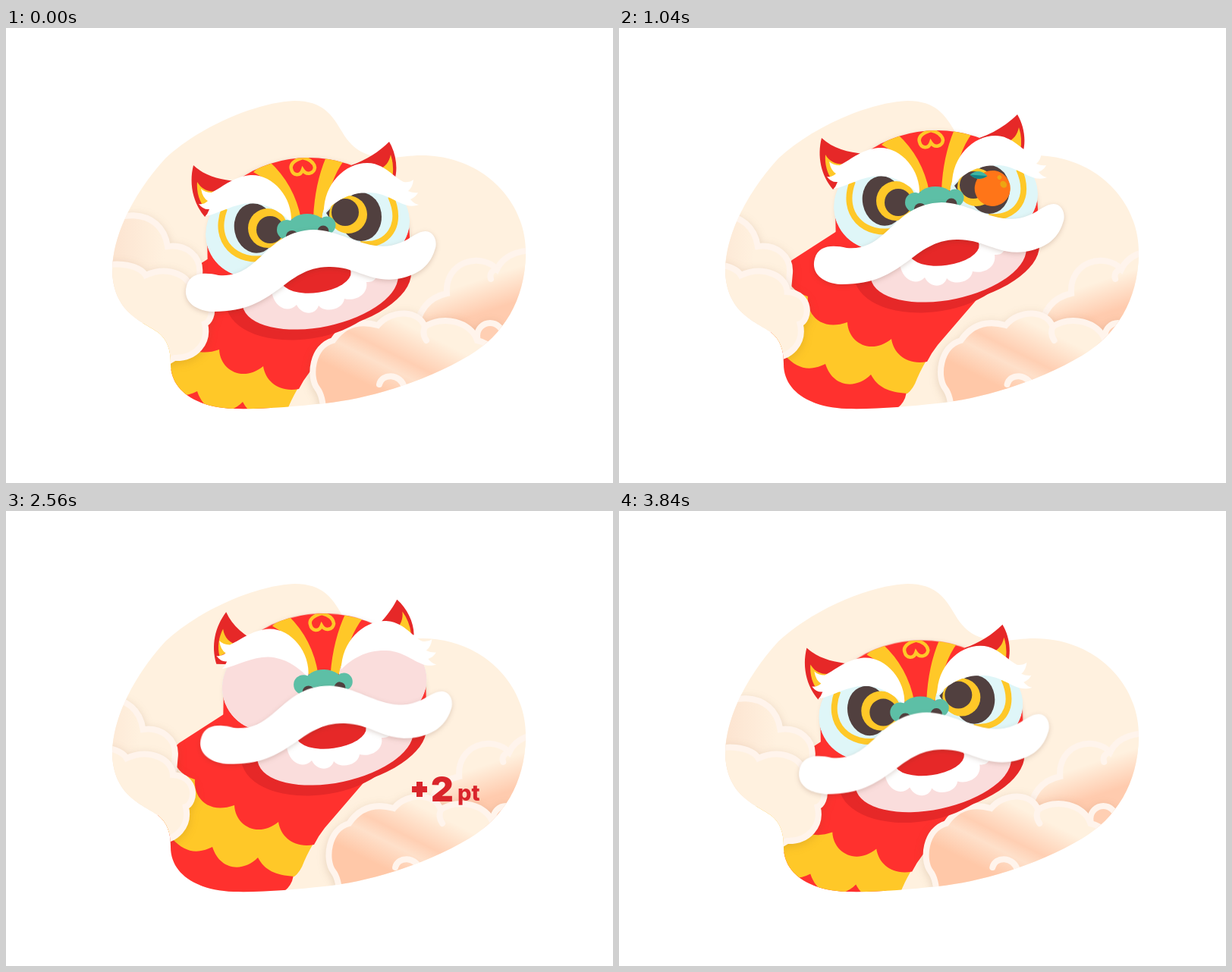
Recreate the animation shown at these times as an HTML page. Size 800x600 px, loop 3.88 s.

```html
<!DOCTYPE html>
<html lang="en">
<head>
<meta charset="utf-8">
<title>Lion dance</title>
<style>
  html, body { margin: 0; width: 100%; height: 100%; overflow: hidden; background: #fff; }
  svg { display: block; width: 800px; height: 600px; }
  .red { fill: #ff312e; } .dark { fill: #e62828; } .gold { fill: #ffc828; }
  .brown { fill: #51403f; } .pink { fill: #fadddc; } .pale { fill: #dff6f8; }
  .white { fill: #fff; } .teal { fill: #5dbfa6; }
  .stripe { fill: none; stroke: #ffc828; stroke-width: 8; }
  .cloud { stroke: #fff4ec; stroke-width: 8; }
  .curl { fill: none; stroke: #fff4ec; stroke-width: 8; stroke-linecap: round; }
  .soft { filter: drop-shadow(0 2px 3px rgba(90, 40, 20, .2)); }
  .lift { filter: drop-shadow(0 3px 6px rgba(120, 70, 30, .18)); }
  #score { fill: #d9252b; font-family: Inter, sans-serif; }
</style>
</head>
<body>
<svg viewBox="0 0 800 600">
  <defs>
    <path id="blob" d="M380,96 C418,96 430,115 443,137 C458,163 478,171 505,171 C520,171 530,168 548,168 C625,168 686,225 685,298 C684,360 655,405 610,432 C555,465 480,489 420,495 C380,499 340,503 300,502 C250,500 217,478 217,443 C217,425 213,411 200,401 C180,387 140,375 140,317 C142,265 175,210 210,172 C255,130 330,98 380,96Z"/>
    <ellipse id="skull" cx="399" cy="275" rx="133" ry="104"/>
    <ellipse id="cheekL" cx="321" cy="272" rx="58" ry="57"/>
    <ellipse id="cheekR" cx="474" cy="255" rx="58" ry="55"/>
    <clipPath id="inBlob"><use href="#blob"/></clipPath>
    <clipPath id="inSkull"><use href="#skull"/></clipPath>
    <clipPath id="inL"><use href="#cheekL"/></clipPath>
    <clipPath id="inR"><use href="#cheekR"/></clipPath>
    <linearGradient id="warm" gradientUnits="userSpaceOnUse" x1="560" y1="380" x2="500" y2="500">
      <stop offset=".18" stop-color="#fff1df"/><stop offset=".5" stop-color="#ffcfb3"/>
      <stop offset=".64" stop-color="#fee0ca"/><stop offset=".88" stop-color="#ffc8a8"/>
    </linearGradient>
    <linearGradient id="far" gradientUnits="userSpaceOnUse" x1="600" y1="310" x2="630" y2="400">
      <stop offset=".3" stop-color="#fff1df"/><stop offset=".75" stop-color="#ffcbae"/>
    </linearGradient>
    <linearGradient id="dusk">
      <stop offset=".1" stop-color="#fbdfcb"/><stop offset=".7" stop-color="#fff1df"/>
    </linearGradient>
    <g id="orange">
      <circle r="29" fill="#ff7518"/>
      <path d="M6,-21 Q-12,-22 -15,-40 Q4,-40 6,-21Z" fill="#3fb5a3"/>
      <path d="M6,-21 Q-12,-22 -15,-40Z" fill="#128488"/>
      <g fill="#eda512"><ellipse cx="18" cy="6" rx="5" ry="6"/><circle cx="20" cy="-7" r="3.5"/></g>
    </g>
  </defs>

  <use href="#blob" fill="#fff1df"/>
  <g clip-path="url(#inBlob)">
    <g id="backRight">
      <path class="cloud" fill="url(#far)" d="M540,400 Q545,358 581,350 C578,308 625,295 647,318 C657,297 680,291 720,292 V420 H560Z"/>
      <path class="curl" d="M647,318 Q636,321 639,331"/>
    </g>
    <g id="body">
      <g transform="translate(-20 36)">
        <path class="red" d="M200,400 L385,470 Q379,478 377,488 Q372,500 360,505 L350,560 H200Z"/>
        <path class="gold" d="M200,340 L250,353 L410,430 Q399,448 393,462 Q388,476 380,482 C355,480 341,474 332,457 C312,477 282,474 272,443 C252,453 235,450 219,432 L200,400Z"/>
        <path class="red" d="M287,268 L228,306 Q218,314 220,328 Q228,348 249,354 C247,380 268,400 301,388 C302,415 332,432 359,410 C362,430 380,445 406,440 Q412,428 420,418 L530,290 L420,250Z"/>
      </g>
    </g>
    <g id="frontRight" class="lift">
      <circle class="cloud" cx="638" cy="406" r="17" fill="#ffcfb3"/>
      <path class="cloud" fill="url(#warm)" d="M418,520 Q420,488 410,475 C399,460 403,420 431,412 C450,384 476,388 490,392 C508,370 545,372 552,394 C575,378 613,387 621,412 C638,416 653,430 648,450 L638,520Z"/>
      <path class="curl" d="M552,394 Q548,403 554,412 M492,470 C495,455 520,455 525,474"/>
    </g>
    <path id="backLeft" class="cloud lift" fill="url(#dusk)" d="M100,280 C140,235 205,235 213,288 C237,285 258,300 255,325 L250,380 H100Z"/>
    <path id="frontLeft" class="cloud lift" fill="#fff1df" d="M100,325 C140,302 177,313 184,326 C215,312 245,328 245,348 C278,350 275,385 262,390 C268,415 250,436 222,435 L180,460 L100,440Z"/>
  </g>

  <g id="head">
    <g id="tiltBack">
      <g id="earL">
        <path class="dark" d="M247,181 C262,195 282,200 303,202 L310,230 L262,249 C246,230 241,205 247,181Z"/>
        <path class="gold" d="M252,203 C258,213 267,217 281,215 L262,238 C254,228 251,215 252,203Z"/>
      </g>
      <g id="earR">
        <path class="dark" d="M505,150 C492,163 475,174 455,181 L470,205 L512,201 C517,185 514,165 505,150Z"/>
        <path class="gold" d="M507,167 C505,177 500,183 490,188 L509,198 Q512,182 507,167Z"/>
      </g>
      <use href="#skull" class="red soft"/>
      <path class="red" d="M265,270 L266,325 L320,345 V270Z"/>
    </g>
    <g id="jaw">
      <ellipse class="dark" cx="395" cy="350" rx="106" ry="60" transform="rotate(-9 395 350)"/>
      <ellipse class="dark" cx="418" cy="342" rx="118" ry="57" transform="rotate(-12 418 342)"/>
      <ellipse class="pink" cx="414" cy="345" rx="104.5" ry="49" transform="rotate(-12 414 345)"/>
      <path class="white" d="M350,340 C348,362 368,380 383,365 C390,379 408,379 412,366 C420,376 444,372 446,357 C462,361 478,350 475,335 C484,336 489,330 488,325 L455,312 L360,320Z"/>
      <ellipse class="dark" cx="409" cy="328" rx="46" ry="21" transform="rotate(-8 409 328)"/>
      <circle id="bite" cx="408" cy="350" r="15" fill="#ff7518"/>
    </g>
    <g id="tilt">
      <g clip-path="url(#inSkull)">
        <path class="gold" d="M326,190 Q336,180 347,176 Q380,206 389,252 L376,252 Q368,212 326,190Z M422,170 Q432,170 446,174 Q426,200 420,250 L405,250 Q407,205 422,170Z"/>
        <path class="stripe" style="stroke-width:4.5" d="M391,171 C380,174 374,180 376,186 C378,195 388,196 391,187 C396,195 406,192 407,184 C406,177 400,173 391,171Z"/>
      </g>
      <g clip-path="url(#inL)">
        <use href="#cheekL" class="pale"/>
        <path class="stripe" d="M288,238 C271,282 304,312 345,303"/>
        <ellipse class="brown" cx="328" cy="264" rx="27" ry="33" transform="rotate(-12 328 264)"/>
        <circle class="gold" cx="345" cy="264" r="26"/>
        <circle class="brown" cx="348" cy="266" r="18"/>
        <use href="#cheekL" class="pink lid"/>
      </g>
      <g clip-path="url(#inR)">
        <use href="#cheekR" class="pale"/>
        <path class="stripe" d="M507,222 C524,260 504,288 467,285"/>
        <ellipse class="brown" cx="468" cy="249" rx="27" ry="32"/>
        <path class="brown" d="M422,244 L440,225 L436,265Z"/>
        <circle class="gold" cx="451" cy="246" r="25"/>
        <circle class="brown" cx="447" cy="243" r="18"/>
        <use href="#cheekR" class="pink lid"/>
      </g>
      <path class="white" d="M376,256 C378,222 350,192 322,194 C300,196 288,208 271,217 Q262,217 257,212 Q259,224 266,228 Q261,233 254,232 Q260,240 268,239 Q266,245 262,249 C284,243 300,232 322,231 C345,231 362,243 376,256Z"/>
      <path class="white" d="M419,244 C418,207 446,178 476,178 C498,178 510,196 524,203 Q532,204 537,200 Q536,210 530,215 Q537,218 543,217 Q540,223 533,226 Q538,232 544,233 C522,241 508,217 478,217 C452,217 434,228 419,244Z"/>
      <g class="teal">
        <circle cx="370" cy="266" r="13"/><ellipse cx="397" cy="262" rx="25" ry="17"/><circle cx="423" cy="260" r="11.5"/>
      </g>
      <g class="brown"><circle cx="377" cy="275" r="8"/><circle cx="418" cy="268" r="7.5"/></g>
      <path class="white soft" d="M238,340 C243,322 262,322 280,326 C335,331 340,268 405,266 C445,266 480,300 520,283 C535,277 542,268 553,268 C566,269 569,284 565,293 C558,316 540,327 515,331 C480,336 460,314 425,315 C365,316 358,375 272,374 C245,372 233,357 238,340Z"/>
    </g>
  </g>

  <g id="oranges"></g>
  <g id="score">
    <path d="M541,357h8v6h6v8h-6v6h-8v-6h-6v-8h6z"/>
    <text x="560" y="383" font-size="46" font-weight="900">2</text>
    <text x="595" y="382" font-size="29" font-weight="800">pt</text>
  </g>
</svg>
<script>
  const LOOP = 3880;
  const $ = id => document.getElementById(id);
  const move = (id, value) => $(id).setAttribute('transform', value);
  const ease = (t, from, to) => {
    const u = Math.min(1, Math.max(0, (t - from) / (to - from)));
    return u * u * (3 - 2 * u);
  };
  // Rises during a..b, falls during c..d.
  const pulse = (t, a, b, c, d) => ease(t, a, b) - ease(t, c, d);

  // Each throw is a parabola through (x, y) at time `at`.
  const throws = [
    { at: 600, x: 651, y: 195, r: 35, vx: -360, vy: -330, from: 545, to: 1200 },
    { at: 1560, x: 587, y: 92, r: 26, vx: -346, vy: 10, from: 1370, to: 2030 },
    { at: 3160, x: 570, y: 457, r: 29, vx: -320, vy: -706, from: 3135, to: 3640 },
    { at: 3160, x: 202, y: 206, r: 21, vx: 545, vy: -86, from: 3115, to: 3560 }
  ];
  for (const o of throws) {
    o.node = document.createElementNS('http://www.w3.org/2000/svg', 'use');
    o.node.setAttribute('href', '#orange');
    $('oranges').append(o.node);
  }

  function fly(o, t) {
    const dt = (t - o.at) / 1000;
    const r = o.r - 26 * dt;
    const x = o.x + o.vx * dt, y = o.y + o.vy * dt + 833 * dt * dt;
    o.node.style.display = t >= o.from && t < o.to ? '' : 'none';
    o.node.setAttribute('transform', `translate(${x} ${y}) rotate(${(r - 29) * 7}) scale(${r / 29})`);
  }

  function draw(t) {
    const rise = pulse(t, 0, 960, 3280, LOOP);
    const tilt = 6 * ease(t, 2120, 2900) - 1.5 * ease(t, 1800, 2080) - 4.5 * ease(t, 3280, LOOP);
    const shut = pulse(t, 1860, 2220, 2740, 3000);
    const chew = pulse(t, 1960, 2080, 2200, 2420);
    // Clouds part, then close, peaking a little before mid-loop.
    const drift = Math.sin(Math.PI * (t / LOOP) ** .93) ** 1.25;

    for (const id of ['head', 'body']) move(id, `translate(${20 * rise} ${-36 * rise})`);
    for (const id of ['tilt', 'tiltBack']) move(id, `rotate(${tilt} 395 323)`);
    move('earL', `rotate(${21 * shut} 275 225)`);
    move('earR', `rotate(${-20 * shut} 495 195)`);
    move('jaw', `translate(0 ${-31 * chew})`);
    for (const lid of document.querySelectorAll('.lid'))
      lid.setAttribute('transform', `translate(0 ${-118 * (1 - shut)})`);
    $('bite').style.opacity = t < 2030 ? 0 : 1 - ease(t, 2000, 2160);

    move('frontLeft', `translate(${-31 * drift} 0)`);
    move('backLeft', `translate(${-40 * drift} 0)`);
    move('frontRight', `translate(${26 * drift} 0)`);
    move('backRight', `translate(${20 * drift} 0)`);

    const up = ease(t, 1960, 2400);
    const size = .88 + .12 * up;
    move('score', `translate(580 ${369 + 26 * (1 - up)}) scale(${size}) translate(-580 -369)`);
    $('score').style.opacity = pulse(t, 1960, 2200, 2800, 2960);
    throws.forEach(o => fly(o, t));
  }

  const start = performance.now();
  function frame() {
    draw((performance.now() - start) % LOOP);
    requestAnimationFrame(frame);
  }
  frame();
</script>
</body>
</html>
```
